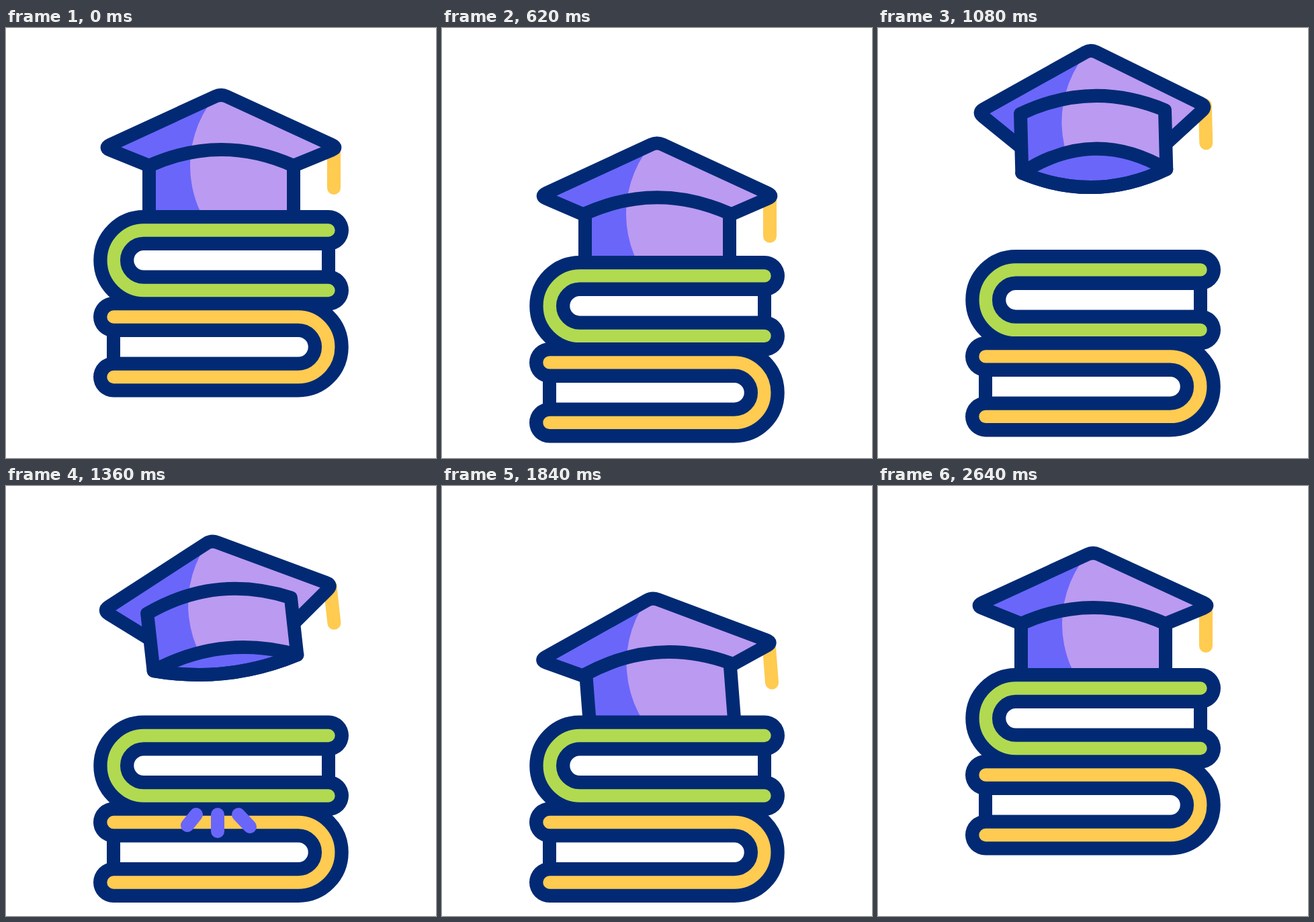
Recreate the animation shown at these times as an HTML page. Size 640x640 px, loop 2800 ms.

```html
<!DOCTYPE html>
<html lang="en">
<head>
<meta charset="utf-8">
<title>Books and cap</title>
<style>
  html, body { margin: 0; width: 100%; height: 100%; overflow: hidden; background: #fff; }
  svg { display: block; width: 100vw; height: 100vh; }
  .ink { stroke: #022a74; stroke-width: 20; }
  .cover { stroke: #022a74; stroke-width: 60; }
  .green { stroke: #b1da51; stroke-width: 19.4; }
  .gold { stroke: #ffcb50; stroke-width: 19.4; }
  .violet { fill: #6a66fa; }
  .lilac { fill: #bb9af1; }
</style>
</head>
<body>
<svg viewBox="0 0 640 640" fill="none" stroke-linecap="round" stroke-linejoin="round">
  <defs>
    <path id="board"/>
    <path id="body"/>
    <path id="mouth"/>
    <path id="top" d="M480 301H205a44.75 44.75 0 0 0 0 89.5H480"/>
    <path id="low" d="M160 430H435a44.75 44.75 0 0 1 0 89.5H160"/>
    <clipPath id="inBoard"><use href="#board"/></clipPath>
    <clipPath id="inBody"><use href="#body"/></clipPath>
  </defs>
  <g id="cap">
    <path d="M488 182V238" stroke="#ffcb50" stroke-width="20"/>
    <use href="#board" class="violet"/>
    <g clip-path="url(#inBoard)"><circle cx="435.5" cy="205" r="161.5" class="lilac"/></g>
    <use href="#board" class="ink"/>
    <use href="#body" class="violet"/>
    <g clip-path="url(#inBody)"><circle cx="435.5" cy="205" r="161.5" class="lilac"/></g>
    <use href="#mouth" class="violet ink"/>
    <use href="#body" class="ink"/>
  </g>
  <g id="books">
    <path d="M480 301V390M160 430V520" class="ink"/>
    <path d="M205 331H470V360.5H205a14.75 14.75 0 0 1 0 -29.5M170 460H435a14.75 14.75 0 0 1 0 29.5H170" fill="#fff"/>
    <use href="#top" class="cover"/>
    <use href="#low" class="cover"/>
    <use href="#top" class="green"/>
    <use href="#low" class="gold"/>
  </g>
  <path id="rays" stroke="#6a66fa" stroke-width="20"/>
</svg>
<script>
const LOOP = 2800, STEP = 20;
const el = id => document.getElementById(id);
const cap = el('cap'), books = el('books'), rays = el('rays');
const board = el('board'), body = el('body'), mouth = el('mouth');

const ease = u => {
  u = Math.min(1, Math.max(0, u));
  return u * u * (3 - 2 * u);
};
const mix = (a, b, k) => a + (b - a) * k;

// Eased value at time t through [time, value] keys
function track(t, keys) {
  let v = keys[0][1];
  for (let i = 1; i < keys.length; i++) {
    const [t0] = keys[i - 1], [t1, v1] = keys[i];
    if (t > t0) v = mix(keys[i - 1][1], v1, ease((t - t0) / (t1 - t0)));
  }
  return v;
}

const bookY = [[0, 0], [600, 70.5], [800, -21.5], [1160, 70.5], [2000, 70.5], [2600, 0]];
const capY = [[0, 0], [600, 76], [800, -75], [880, -75], [2000, 76], [2600, 0]];
const capX = [[1360, 0], [1840, 2.5], [2000, 0]];
const tilt = [[900, 0], [1550, -8], [1700, -8], [2000, 0]];
const lift = [[600, 0], [800, 1], [840, 1], [2000, 0]];
const rayLines = [[283, 489, 270, 505], [315, 489, 315, 514], [346, 489, 363, 507]];

// Closed polygon with corners softened by d pixels
function rounded(points) {
  const n = points.length;
  const toward = ([x, y], [p, q], d) => {
    const k = d / Math.hypot(p - x, q - y);
    return [mix(x, p, k), mix(y, q, k)];
  };
  return points.map(([x, y, d], i) => {
    const a = toward([x, y], points[(i + n - 1) % n], d);
    const b = toward([x, y], points[(i + 1) % n], d);
    return `${i ? 'L' : 'M'}${a}Q${x} ${y} ${b}`;
  }).join('') + 'Z';
}

// m = 0: seen level, m = 1: seen from below
function shapeCap(m) {
  const q = (1 - m) ** 2;
  const side = 178 + 6 * m, front = 238 - 33 * q;
  board.setAttribute('d', rounded([
    [146 + 4 * m, side, 10], [320, 98 - 4.5 * m, 9], [494 - 4 * m, side, 10],
    [428, front, 1], [213, front, 1]
  ]));
  const top = 205 - 20 * m, base = 275 + 23 * q;
  const lower = `M428 ${base}Q320.5 ${base + 54 * m} 213 ${base}`;
  body.setAttribute('d',
    `M213 ${top}Q320.5 ${top - 48} 428 ${top}V${base}` + lower.slice(lower.indexOf('Q')) + 'Z');
  mouth.setAttribute('d', `${lower}Q320.5 ${base - 75 * m} 428 ${base}Z`);
}

function drawRays(t) {
  const head = ease((t - 1200) / 150), tail = ease((t - 1370) / 130);
  rays.setAttribute('d', head > 0 && tail < 1
    ? rayLines.map(([x, y, p, q]) =>
        `M${mix(x, p, tail)} ${mix(y, q, tail)}L${mix(x, p, head)} ${mix(y, q, head)}`).join('')
    : '');
}

function draw(t) {
  shapeCap(track(t, lift));
  cap.setAttribute('transform',
    `translate(${track(t, capX)} ${track(t, capY)}) rotate(${track(t, tilt)} 320.5 225)`);
  books.setAttribute('transform', `translate(0 ${track(t, bookY)})`);
  drawRays(t);
}

function tick() {
  draw(Math.floor((performance.now() % LOOP) / STEP) * STEP);
  requestAnimationFrame(tick);
}
tick();
</script>
</body>
</html>
```
